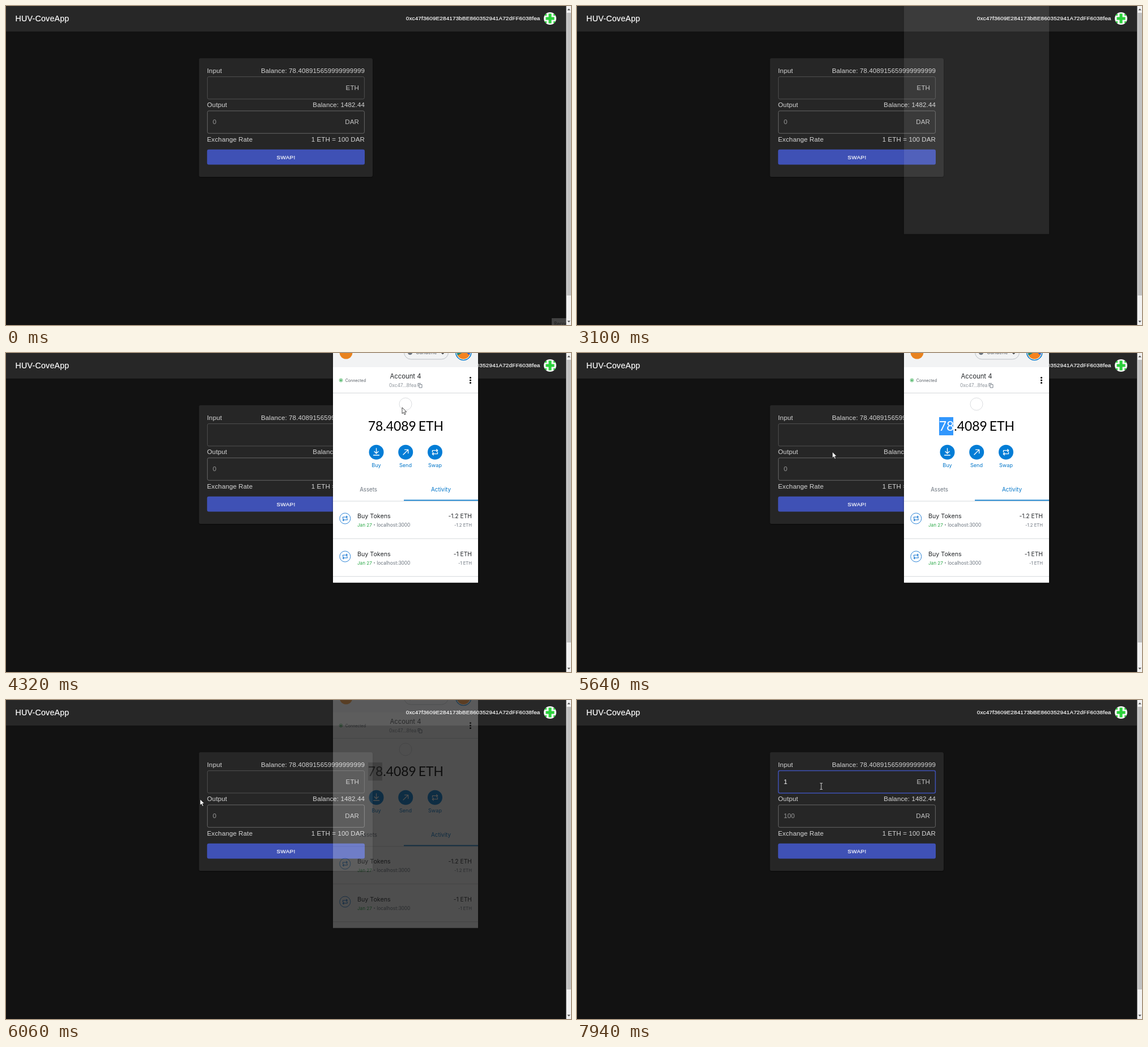
An HTML page for the animation above (8000 ms loop, 997x562 px).

```html
<!DOCTYPE html>
<html lang="en">
<head>
<meta charset="utf-8">
<title>Token swap</title>
<style>
html, body { margin: 0; width: 100%; height: 100%; overflow: hidden; background: #121212; }
svg { display: block; width: 997px; height: 562px; }
.page { font: 11.5px "Liberation Sans", Arial, sans-serif; letter-spacing: .133px; fill: #d6d6d6; }
.wallet { font-family: Inter, sans-serif; fill: #24272a; }
.list { font: 600 9px "Open Sans", "Noto Sans", sans-serif; fill: #fff; }
.strong { fill: #fff; stroke: #fff; stroke-width: .2; }
.end { text-anchor: end; }
.mid { text-anchor: middle; }
.blue { fill: #0376c9; }
.line { fill: none; stroke: #d6d9dc; }
.mark { fill: none; stroke-width: 1.3; stroke-linecap: round; stroke-linejoin: round; }
</style>
</head>
<body>
<svg viewBox="0 0 997 562" xmlns="http://www.w3.org/2000/svg">
  <defs>
    <filter id="shade" x="-10%" y="-10%" width="120%" height="125%">
      <feDropShadow dx="0" dy="1" stdDeviation="1.6" flood-color="#000" flood-opacity=".5"/>
    </filter>
    <clipPath id="face"><circle cx="960" cy="22" r="11"/></clipPath>
    <clipPath id="user"><circle cx="807.3" cy="-1" r="11.7"/></clipPath>
    <clipPath id="frame"><rect x="577" y="0" width="256" height="404.6"/></clipPath>
    <g id="swap" class="mark">
      <path d="M-4.5 0V-3H4.5M2.7-5L4.7-3L2.7-1M4.5 0V3H-4.5M-2.7 1L-4.7 3L-2.7 5"/>
    </g>
  </defs>

  <rect width="997" height="562" fill="#121212"/>
  <g class="page">
    <rect width="988" height="45" fill="#272727"/>
    <text x="16.5" y="27" class="strong" style="font-size:14.2px;letter-spacing:.25px">HUV-CoveApp</text>
    <text x="942.5" y="25" class="end strong" style="font-size:9.9px;letter-spacing:.17px">0xc47f3609E284173bBE860352941A72dFF6038fea</text>
    <g clip-path="url(#face)">
      <rect x="949" y="11" width="22" height="22" fill="#f6f6f6"/>
      <path fill="#2ad13a" d="M957.5 13.5h5v6h5v5h-5v6h-5v-6h-5v-5h5zM949 14h5v3h-5zM966 14h5v3h-5zM949 27h5v3h-5zM966 27h5v3h-5z"/>
    </g>

    <rect x="340.5" y="92" width="306.5" height="209" rx="3" fill="#252525" filter="url(#shade)"/>
    <text x="354.8" y="118">Input</text>
    <text x="633" y="118" class="end">Balance: 78.408915659999999999</text>
    <rect id="field" x="355.4" y="124.6" width="277" height="39.3" rx="2.5" fill="none"/>
    <text x="623" y="148" class="end" fill="#c4c4c4">ETH</text>
    <text id="amount" x="364.8" y="148" fill="#fff">1</text>
    <text x="354.8" y="178">Output</text>
    <text x="633" y="178" class="end">Balance: 1482.44</text>
    <rect x="355.4" y="184.8" width="277" height="39.5" rx="2.5" fill="none" stroke="#6c6c6c" stroke-width=".9"/>
    <text id="result" x="364.8" y="208" fill="#999">0</text>
    <text x="623" y="208" class="end" fill="#c4c4c4">DAR</text>
    <text x="354.8" y="238.5">Exchange Rate</text>
    <text x="633" y="238.5" class="end">1 ETH = 100 DAR</text>
    <rect x="354.8" y="252.8" width="278.2" height="26.7" rx="3" fill="#3f51b5"/>
    <text x="494" y="269.5" class="mid strong" style="font-size:9.9px;letter-spacing:.3px">SWAP!</text>
    <rect id="caret" x="364.9" y="138" width="1" height="12.5" fill="#fff"/>
  </g>

  <g id="list" class="list">
    <rect id="listBox" x="355" y="166" width="239" rx="2.5" fill="#292a2d" filter="url(#shade)"/>
    <g id="rows"></g>
  </g>

  <g id="tip">
    <rect x="963" y="550" width="26" height="12" fill="#424242"/>
    <text x="967" y="563" font-size="8.5" font-family="Open Sans, sans-serif" fill="#191919">Recor</text>
  </g>
  <rect x="988.5" width="8.5" height="562" fill="#f1f1f1"/>
  <rect x="989.5" y="12" width="7.5" height="498" fill="#c1c1c1"/>
  <path d="M990.5 7.5l2.7-3l2.7 3zM990.5 554.5l2.7 3l2.7-3z" fill="#505050"/>

  <g id="wallet" class="wallet">
    <rect x="577" y="-20" width="256" height="424.6" fill="#fff" filter="url(#shade)"/>
    <g id="content" clip-path="url(#frame)">
      <rect x="577" y="-20" width="256" height="45" fill="#f2f3f4"/>
      <circle cx="600" cy="-1" r="11.5" fill="#e8821e"/>
      <rect x="702.5" y="-13" width="78" height="24" rx="12" class="line" style="stroke:#bbc0c5"/>
      <circle cx="713" cy="-1" r="4.2" fill="#6a737d"/>
      <text x="723" y="2.4" font-size="8.9" fill="#535a61">Ganache</text>
      <path d="M768-1l2.6 2.6L773.2-1" class="mark" stroke="#24272a"/>
      <circle cx="807.3" cy="-1" r="13.6" fill="#fff" stroke="#0376c9" stroke-width="1.4"/>
      <g clip-path="url(#user)">
        <rect x="794" y="-14" width="27" height="28" fill="#f5821f"/>
        <path d="M794-14V6L808-2Z" fill="#18887b"/>
        <path d="M808-4L821 6V-14Z" fill="#2362d8"/>
      </g>
      <circle cx="591" cy="48" r="2.9" fill="none" stroke="#28a745" stroke-width=".7"/>
      <circle cx="591" cy="48" r="1.6" fill="#28a745"/>
      <text x="598.7" y="50.5" font-size="7" fill="#535a61">Connected</text>
      <text x="705" y="45" font-size="11.3" class="mid">Account 4</text>
      <text x="676" y="60" font-size="8.4" fill="#8b9299">0xc47...8fea</text>
      <path d="M727 59V53.5H732M729 55.500h5v5.500h-5z" fill="none" stroke="#6a737d" stroke-width=".9"/>
      <path d="M819.5 43.5v0M819.5 48v0M819.5 52.5v0" stroke="#000" stroke-width="3.2" stroke-linecap="round"/>
      <path d="M577 70.5H833M577 261H833M577 327H833M577 393.700H833" class="line"/>
      <circle cx="705" cy="90" r="11" class="line" stroke-width=".9"/>

      <rect id="pick" y="113" height="32"/>
      <text x="638.7" y="136.5" font-family="Lato, sans-serif" font-size="22.9" word-spacing="-1.8" fill="#000"><tspan id="d7">7</tspan><tspan id="d8">8</tspan>.4089 ETH</text>

      <g fill="#037dd6">
        <circle cx="653.5" cy="174.7" r="13"/><circle cx="705.2" cy="174.7" r="13"/><circle cx="757" cy="174.7" r="13"/>
      </g>
      <path d="M653.5 168v8.5M650 173.5l3.5 3.5l3.5-3.5M648.5 180h10M701 179l8.5-8.5M703.5 170.3h6.2v6.2" class="mark" stroke="#fff"/>
      <use href="#swap" x="757" y="174.7" stroke="#fff"/>
      <g class="mid blue" font-size="9.1">
        <text x="653.5" y="201">Buy</text><text x="705" y="201">Send</text><text x="757" y="201">Swap</text>
      </g>
      <text x="639.5" y="244" font-size="9.7" class="mid" fill="#6a737d">Assets</text>
      <text x="767.5" y="244" font-size="9.9" class="mid blue">Activity</text>
      <rect x="702" y="258.6" width="131" height="1.7" class="blue"/>
      <g id="deals"></g>
    </g>
  </g>

  <circle id="press" r="8.6" fill="#fff200"/>
  <path id="arrow" d="M0 0V10.8L2.5 8.5L4.2 12.6L6.1 11.8L4.4 7.8H7.8Z" fill="#fff" stroke="#000" stroke-width=".7"/>
  <path id="beam" d="M-2.2-5.5H-.6L0-5L.6-5.5H2.2M0-5V5M-2.2 5.5H-.6L0 5L.6 5.5H2.2" fill="none" stroke="#ddd"/>
</svg>
<script>
const $ = id => document.getElementById(id);
const set = (id, attrs) => { for (const k in attrs) $(id).setAttribute(k, attrs[k]); };
const show = (id, on) => set(id, { visibility: on ? "visible" : "hidden" });
const within = (t, a, b) => t >= a && t < b;

const deal = (eth, y) => `
  <circle cx="598.3" cy="${y}" r="9.5" fill="none" stroke="#1676d2" stroke-width=".9"/>
  <use href="#swap" transform="translate(598.3 ${y}) scale(.85)" stroke="#1676d2"/>
  <text x="620" y="${y - 1}" font-size="10.7">Buy Tokens</text>
  <text x="822" y="${y - 1}" font-size="10.3" class="end">-${eth} ETH</text>
  <text x="620" y="${y + 14}" font-size="8.1" fill="#28a745">Jan 27</text>
  <circle cx="650" cy="${y + 11.2}" r=".9" fill="#6a737d"/>
  <text x="654.2" y="${y + 14}" font-size="8.4" fill="#6a737d">localhost:3000</text>
  <text x="822" y="${y + 14}" font-size="7.7" class="end" fill="#6a737d">-${eth} ETH</text>`;
$("deals").innerHTML = deal("1.2", 291.5) + deal("1", 358.5);

// Pointer steps: first change, last change, number of steps
const bursts = [[70, 820, 11], [890, 1240, 6], [1440, 1580, 3],
  [3830, 4600, 12], [4670, 5430, 12], [5500, 6280, 12]];

// Pointer path: time, x, y
const path = [
  [70, 984, 546], [300, 800, 440], [520, 644, 318], [670, 672, 262], [820, 727, 231],
  [1030, 788, 171], [1240, 857, 94], [1440, 860, 58], [1510, 867, 9], [1580, 868, -30],
  [3830, 807, 0], [4040, 772, 48], [4320, 699, 96], [4460, 661, 113], [4600, 671, 123],
  [4670, 674, 129], [4810, 665, 135], [5150, 643, 146], [5430, 623, 157],
  [5570, 530, 168], [5780, 298, 186], [5920, 298, 186], [5990, 306, 185.5],
  [6130, 372, 166], [6280, 431, 152]];

// Steps fall on whole frames of about 70 ms, so allow a little slack
function snap(t) {
  let last = 0;
  for (const [a, b, n] of bursts) {
    if (t < a) break;
    const gap = (b - a) / (n - 1);
    last = a + gap * Math.min(n - 1, Math.floor((t - a) / gap + .12));
  }
  return last;
}

function pointer(t) {
  const s = snap(t);
  const i = path.findIndex(p => p[0] > s);
  if (i < 0) return path[path.length - 1].slice(1);
  if (i === 0) return [-50, -50];
  const [t0, x0, y0] = path[i - 1], [t1, x1, y1] = path[i];
  const k = (s - t0) / (t1 - t0);
  return [x0 + (x1 - x0) * k, y0 + (y1 - y0) * k];
}

// Value of the last step [time, value] that has begun
const stage = (t, steps) => steps.reduce((v, [at, next]) => t >= at ? next : v, 0);

let shownRows = "";
function fillList(rows) {
  const key = rows.join();
  if (key === shownRows) return;
  shownRows = key;
  set("listBox", { height: 10.5 + rows.length * 25.9 });
  $("rows").innerHTML = rows.map((s, i) => `<text x="363.3" y="${187.3 + i * 25.9}">${s}</text>`).join("");
}

function drawPointer(t) {
  const [x, y] = pointer(t);
  const seen = within(t, 70, 1580) || t >= 3830;
  const text = t >= 6200 || within(t, 4660, 5340);
  const at = { transform: `translate(${x} ${y})` };
  set("arrow", at);
  set("beam", at);
  show("arrow", seen && !text);
  show("beam", seen && text);
  const drag = within(t, 4800, 5430), away = within(t, 5775, 5915), focus = within(t, 6350, 6620);
  show("press", drag || away || focus);
  set("press", { cx: x - .9, cy: y - .3, opacity: t >= 6550 ? .3 : .55 });
}

function drawWallet(t) {
  const alpha = stage(t, [[3100, .09], [3160, .5], [3230, .92], [3300, 1],
    [5920, .9], [5990, .6], [6060, .25], [6130, 0]]);
  set("wallet", { opacity: alpha, transform: `translate(0 ${alpha < 1 ? -3 : 0})` });
  $("content").style.display = t >= 3230 ? "" : "none";

  const x = pointer(t)[0];
  const left = t < 4800 ? 664 : x > 658 ? 664 : x > 645 ? 652 : 639;
  const idle = t >= 5915;
  set("pick", { x: left, width: 664 - left, fill: idle ? "#c8c8c8" : "#3297fd" });
  const ink = on => ({ fill: !on ? "#000" : idle ? "#323232" : "#fff" });
  set("d7", ink(left < 645));
  set("d8", ink(left < 660));
}

function drawForm(t) {
  const focus = t >= 6350, typed = t >= 7400;
  set("field", { stroke: focus ? "#3f51b5" : "#555", "stroke-width": focus ? 1.5 : .9 });
  show("amount", typed);
  $("result").textContent = typed ? "100" : "0";
  set("caret", { x: typed ? 371 : 364.9 });
  show("caret", within(t, 6420, 6950) || within(t, 7400, 7940));
  fillList(t < 7470 ? ["0", "1", "11", "01", "[object HTMLDivElement]", "asdaaaa"] : ["1", "11"]);
  show("list", within(t, 6420, 7540));
}

function draw(t) {
  show("tip", t < 70);
  drawForm(t);
  drawWallet(t);
  drawPointer(t);
}

const start = performance.now();
function tick() {
  draw((performance.now() - start) % 8000);
  requestAnimationFrame(tick);
}
draw(0);
requestAnimationFrame(tick);
</script>
</body>
</html>
```
